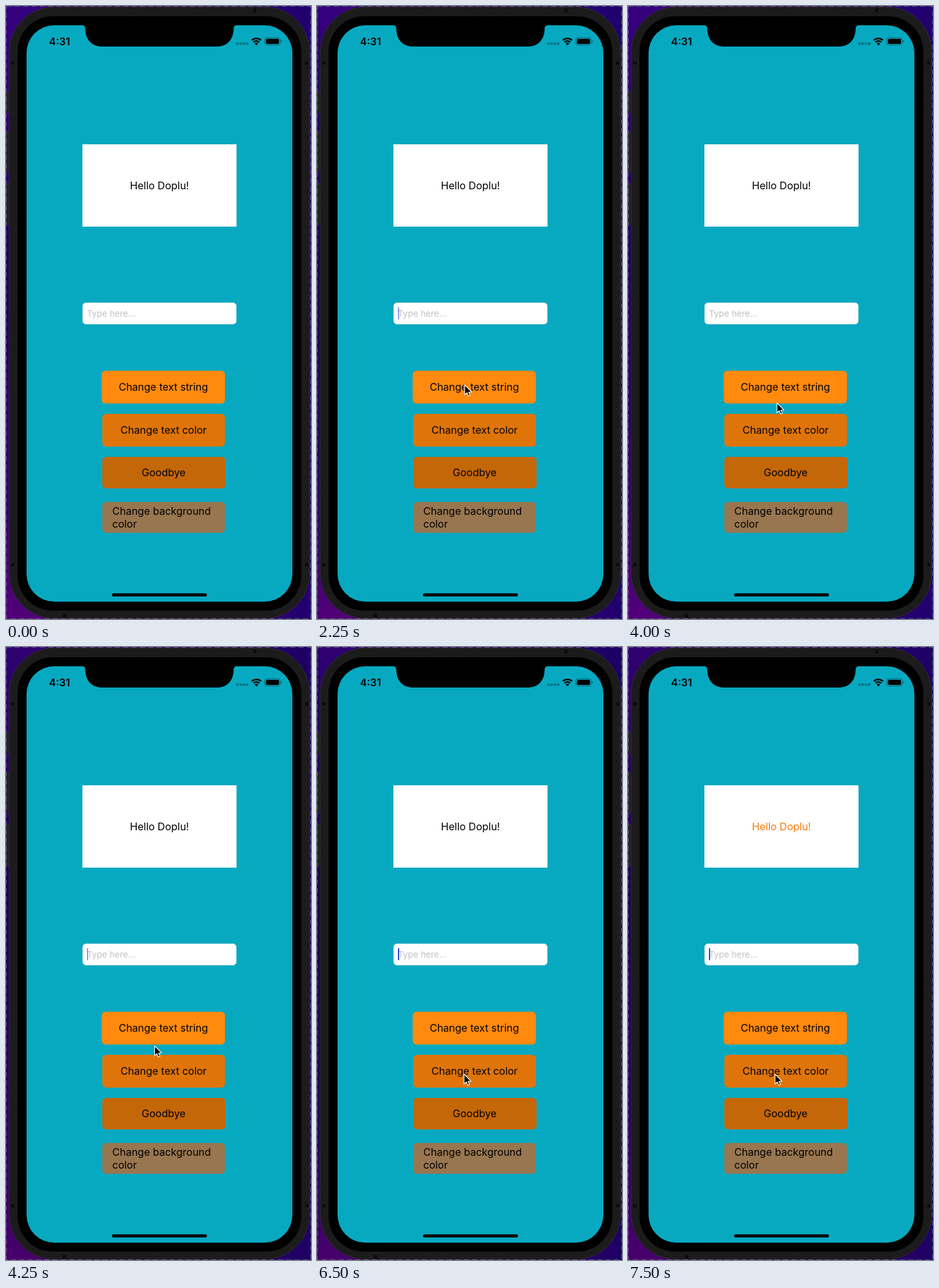
Recreate the animation shown at these times as an HTML page. Size 475 px wide and 953 px high, loop 8000 ms.

```html
<!DOCTYPE html>
<html lang="en">
<head>
<meta charset="utf-8">
<title>Phone screen demo</title>
<style>
html, body { margin: 0; width: 100%; height: 100%; overflow: hidden; background: #22005c; }
svg { display: block; width: 100%; height: 100%; }
text { font-family: Inter, "Open Sans", sans-serif; font-size: 16px; }
.mid { text-anchor: middle; }
</style>
</head>
<body>
<svg viewBox="0 0 475 953" xmlns="http://www.w3.org/2000/svg">
  <defs>
    <linearGradient id="wall" x1="0" y1="0" x2="0" y2="1">
      <stop offset="0" stop-color="#36007e"/>
      <stop offset=".4" stop-color="#1d0056"/>
      <stop offset=".8" stop-color="#30006c"/>
      <stop offset="1" stop-color="#520078"/>
    </linearGradient>
    <linearGradient id="side">
      <stop offset=".5" stop-color="#20006e" stop-opacity="0"/>
      <stop offset="1" stop-color="#20006e"/>
    </linearGradient>
    <pattern id="grain" width="4" height="4" patternUnits="userSpaceOnUse">
      <rect width="4" height="4" fill="#1b1b1b"/>
      <path d="M0 0h1v1h-1zM2 2h1v1h-1z" fill="#252525"/>
      <path d="M2 0h1v1h-1zM1 3h1v1h-1z" fill="#141414"/>
    </pattern>
  </defs>

  <rect width="475" height="953" fill="url(#wall)"/>
  <rect width="475" height="953" fill="url(#side)"/>
  <rect id="shade" width="475" height="953" fill="#10002c"/>

  <g fill="#202020" stroke="#3a3a3a" stroke-width=".8">
    <rect x="1" y="133" width="8" height="33" rx="2"/>
    <rect x="1" y="195" width="8" height="63" rx="2"/>
    <rect x="1" y="276" width="8" height="64" rx="2"/>
  </g>
  <rect x="5" y="1.5" width="468" height="950.5" rx="70" fill="url(#grain)" stroke="#2e2e2e"/>
  <g fill="#0c0c0c">
    <rect x="385" y="4" width="5" height="6"/>
    <rect x="88" y="945" width="6" height="6"/>
    <rect x="8" y="86" width="5" height="5"/>
    <rect x="466" y="86" width="5" height="5"/>
    <rect x="8" y="866" width="5" height="5"/>
    <rect x="466" y="866" width="5" height="5"/>
  </g>
  <rect x=".5" y=".5" width="474" height="952" fill="none" stroke="#a9a2b8" stroke-opacity=".45" stroke-dasharray="8 5"/>
  <rect x="18" y="16" width="442" height="924" rx="55"/>

  <rect x="32" y="30" width="414" height="896" rx="43" fill="#07a9c1"/>
  <path d="M118 29.500C122 30 123.500 32 123.500 36C124 53 134 63 150 63H328C344 63 354 53 354.500 36C354.500 32 356 30 360 29.500Z"/>

  <text x="67" y="60.500" font-weight="600">4:31</text>
  <path d="M358.500 58.500h19" stroke="#056f80" stroke-width="3.400" stroke-dasharray="3.600 1.500"/>
  <g fill="none" stroke="#000" stroke-width="2.300">
    <path d="M382.800 53.300a10.200 10.200 0 0 1 14.400 0"/>
    <path d="M385.400 56.300a6.500 6.500 0 0 1 9.200 0"/>
  </g>
  <path d="M387.300 58.400a3.800 3.800 0 0 1 5.400 0L390 61.300Z"/>
  <rect x="403" y="49.300" width="24" height="11.400" rx="3.200" fill="none" stroke="#05606f"/>
  <rect x="404.800" y="51" width="20.400" height="8" rx="1.800"/>
  <path d="M428.300 53v4q1.400-.6 1.400-2t-1.400-2" fill="#05606f"/>

  <rect x="119" y="215" width="240" height="128" fill="#fff"/>
  <text id="label" class="mid" x="239" y="285">Hello Doplu!</text>

  <rect x="119.500" y="461.500" width="239" height="33" rx="5" fill="#fff" stroke="#d3e3e6"/>
  <text x="126" y="483" style="font-size:13.500px" fill="#c2c2c4">Type here...</text>
  <rect id="caret" x="126" y="468" width="2" height="19" rx=".8" fill="#3048d4"/>

  <rect x="149" y="567" width="192" height="51" rx="6" fill="#ff8a0d"/>
  <text class="mid" x="245" y="598">Change text string</text>
  <rect x="150" y="634" width="191" height="51" rx="6" fill="#df750a"/>
  <text class="mid" x="245.500" y="665">Change text color</text>
  <rect x="150" y="701" width="192" height="49" rx="6" fill="#c46708"/>
  <text class="mid" x="245.500" y="731">Goodbye</text>
  <rect x="150" y="771" width="191" height="48" rx="6" fill="#987650"/>
  <text x="165.500" y="790.500">Change background</text>
  <text x="165.500" y="810.500">color</text>

  <rect x="165" y="913" width="148" height="5" rx="2.500" fill="#0b0d0e"/>
  <path id="pointer" d="M0 0V15.400L3.500 12.100L5.900 17.400L8.400 16.300L6.100 11.200H10.800Z" stroke="#fff" stroke-width="1.100" stroke-linejoin="round"/>
</svg>
<script>
const LOOP = 8000, TICK = 250;
const [shade, label, caret, pointer] =
  ["shade", "label", "caret", "pointer"].map(id => document.getElementById(id));

// Pointer stops: time, x, y
const stops = [
  [250, 238, 320], [500, 243, 392], [750, 246, 456], [1000, 247, 461],
  [1500, 247, 463], [1750, 243, 520], [2000, 233, 578], [2250, 230, 589],
  [2500, 231, 614], [3000, 232, 646], [3250, 232, 640], [3750, 232, 618],
  [4000, 232, 617], [4500, 231, 623], [4750, 230, 650], [5000, 229, 664]
];
const blink = [0, 0.55, 1, 1];

function pointerAt(t) {
  const next = stops.findIndex(s => s[0] > t);
  if (next < 0) return stops[stops.length - 1].slice(1);
  const [t0, x0, y0] = stops[next - 1], [t1, x1, y1] = stops[next];
  const k = (t - t0) / (t1 - t0);
  return [x0 + (x1 - x0) * k, y0 + (y1 - y0) * k];
}

function draw(time) {
  const step = Math.floor((time % LOOP) / TICK), t = step * TICK;
  const shown = t >= stops[0][0];
  pointer.style.display = shown ? "" : "none";
  if (shown) pointer.setAttribute("transform", `translate(${pointerAt(t)})`);
  caret.setAttribute("opacity", t < 750 ? 0 : blink[step % 4]);
  label.setAttribute("fill", t < 7250 ? "#000" : "#f47a0c");
  shade.setAttribute("opacity", t < 4250 ? 0 : 0.15);
}

function loop() {
  draw(performance.now());
  requestAnimationFrame(loop);
}
loop();
</script>
</body>
</html>
```
